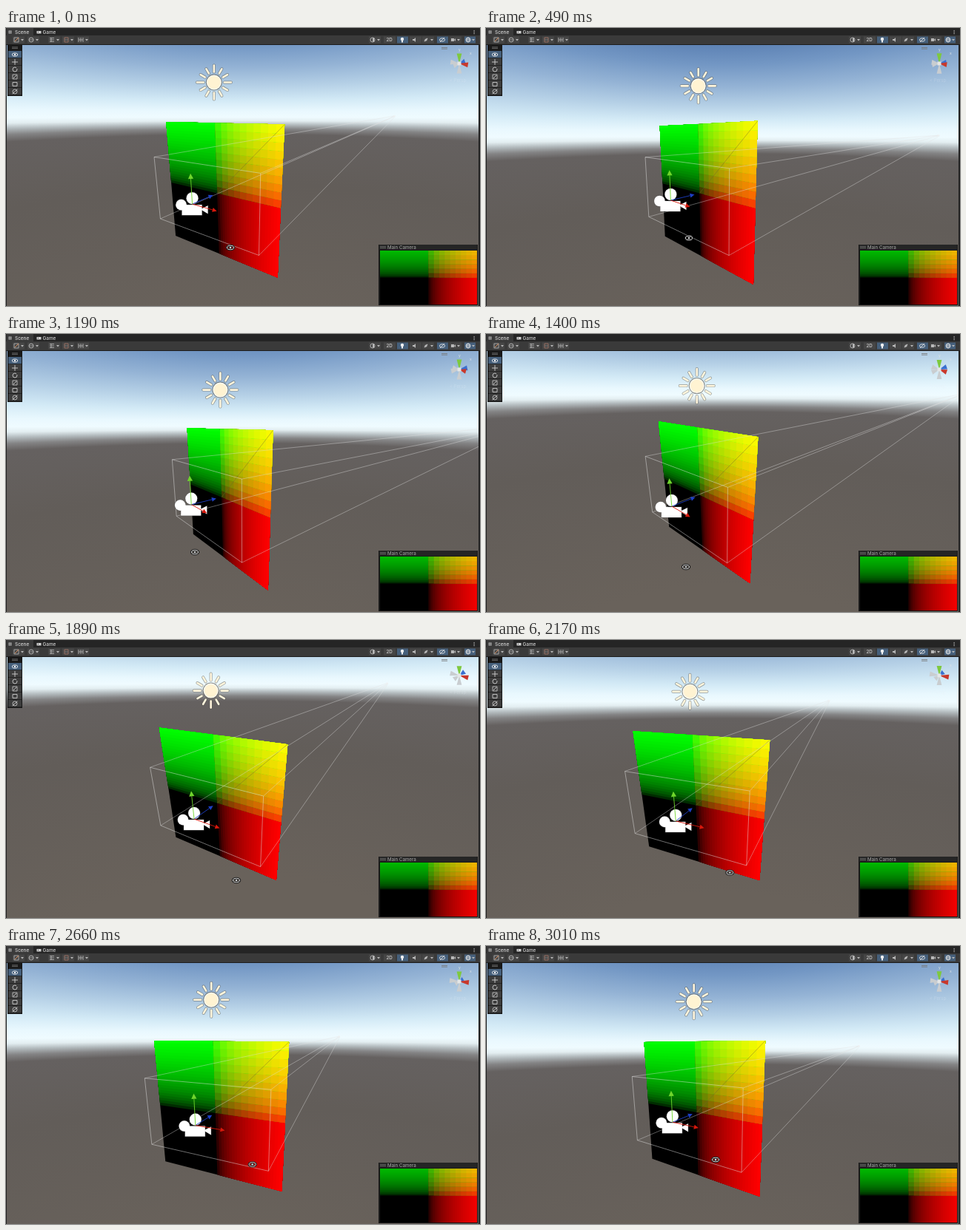
An HTML page with a canvas for the animation above (3080 ms loop, 640 px wide and 376 px high).

```html
<!DOCTYPE html>
<html lang="en">
<head>
<meta charset="utf-8">
<title>Scene view orbit</title>
<style>
  html, body { margin: 0; width: 100%; height: 100%; overflow: hidden; background: #645e5a; }
  canvas { display: block; width: 640px; height: 376px; }
</style>
</head>
<body>
<canvas id="stage" width="640" height="376"></canvas>
<script>
const ctx = document.getElementById('stage').getContext('2d');
const LOOP = 3080, STEP = 70, TAU = Math.PI * 2, DEG = Math.PI / 180;

// The drag that turns the view: time, pointer x, pointer y.
const drag = [
  [0, 303, 297], [490, 274, 284], [1190, 255, 295], [1400, 270, 315],
  [1890, 311, 325], [2450, 338, 301], [3010, 310, 289]
];

function slope(k, c) {
  const last = drag.length - 1;
  const secant = i => (drag[i + 1][c] - drag[i][c]) / (drag[i + 1][0] - drag[i][0]);
  if (k === 0) return 1.5 * secant(0) - 0.5 * slope(1, c);
  if (k === last) return 1.5 * secant(last - 1) - 0.5 * slope(last - 1, c);
  const a = drag[k][0] - drag[k - 1][0], b = drag[k + 1][0] - drag[k][0];
  return (secant(k - 1) * b + secant(k) * a) / (a + b);
}

// Smooth curve through the drag points.
function pointer(t) {
  let k = 0;
  while (k < drag.length - 2 && t >= drag[k + 1][0]) k++;
  const span = drag[k + 1][0] - drag[k][0], s = (t - drag[k][0]) / span;
  const s2 = s * s, s3 = s2 * s;
  return [1, 2].map(c =>
    (2 * s3 - 3 * s2 + 1) * drag[k][c] + (3 * s2 - 2 * s3) * drag[k + 1][c] +
    span * ((s3 - 2 * s2 + s) * slope(k, c) + (s3 - s2) * slope(k + 1, c)));
}

// World, in units of the orbit radius; the pivot is the origin.
const CX = 320, CY = 199, FOCAL = 306.6;
const UNIT = 0.161, ASPECT = 1.8, ARROW = 0.13;
const CAMERA = [-0.124, -0.099, -0.192], SUN = [-0.135, 0.39, -0.017];

const add = (p, x, y, z) => [p[0] + x, p[1] + y, p[2] + z];

function orbit(px, py) {
  const yaw = (33.1 + 0.355 * (303 - px)) * DEG, pitch = (14.7 + 0.36 * (py - 297)) * DEG;
  const sy = Math.sin(yaw), cy = Math.cos(yaw), sp = Math.sin(pitch), cp = Math.cos(pitch);
  const turn = ([x, y, z]) => {
    const ahead = z * cy - x * sy;
    return [x * cy + z * sy, y * cp + ahead * sp, ahead * cp - y * sp];
  };
  const project = p => {
    const [x, y, z] = turn(p), k = FOCAL / (1 + z);
    return [CX + x * k, CY - y * k];
  };
  return { turn, project, depth: FOCAL / cp, horizon: CY - FOCAL * sp / cp };
}

// Corners of an upright rectangle, clockwise from top left.
const frame = (c, w, h) => [[-w, h], [w, h], [w, -h], [-w, -h]].map(([x, y]) => add(c, x, y, 0));

function rect(x, y, w, h, color) {
  ctx.fillStyle = color;
  ctx.fillRect(x, y, w, h);
}

function path(points, close) {
  ctx.beginPath();
  points.forEach(([x, y]) => ctx.lineTo(x, y));
  if (close) ctx.closePath();
}

function poly(points, color) {
  path(points, true);
  ctx.fillStyle = color;
  ctx.fill();
}

function line(points, color, width = 1, close = false) {
  path(points, close);
  ctx.strokeStyle = color;
  ctx.lineWidth = width;
  ctx.stroke();
}

function disc(x, y, r, color) {
  ctx.beginPath();
  ctx.arc(x, y, r, 0, TAU);
  ctx.fillStyle = color;
  ctx.fill();
}

function ring(x, y, rx, ry, color, width = 1) {
  ctx.beginPath();
  ctx.ellipse(x, y, rx, ry, 0, 0, TAU);
  ctx.strokeStyle = color;
  ctx.lineWidth = width;
  ctx.stroke();
}

function text(str, x, y, size, color, weight = 400) {
  ctx.font = `${weight} ${size}px Inter, Roboto, sans-serif`;
  ctx.fillStyle = color;
  ctx.fillText(str, x, y);
}

const level = x => Math.round(255 * Math.pow(x, 1 / 2.2));

// Red grows right of the middle, green above it; later cells cover earlier ones.
function colorPlane(map, maxR, maxG, cols, rows) {
  const cell = (u0, v0, u1, v1, r, g) =>
    poly([map(u0, v0), map(u1, v0), map(u1, v1), map(u0, v1)], `rgb(${r},${g},0)`);
  const fine = 24;
  cell(0, 0, 1, 1, 0, 0);
  for (let i = 0; i < fine; i++) {
    const s = i / fine, mid = s + 0.5 / fine;
    cell(0.5 + s / 2, 0.5, 1, 1, level(mid * maxR), 0);
    cell(0, 0, 0.5, 0.5 - s / 2, 0, level(mid * maxG));
  }
  for (let j = 0; j < rows; j++)
    for (let i = 0; i < cols; i++)
      cell(0.5 + i / cols / 2, 0, 1, 0.5 - j / rows / 2,
        level((i + 0.5) / cols * maxR), level((j + 0.5) / rows * maxG));
}

// Colours by distance below the horizon at the middle of the view.
const skyStops = [
  [-125, '#5b80b3'], [-95, '#7397c4'], [-65, '#94b3d5'], [-40, '#b5d0e6'], [-20, '#d3eaf6'],
  [-6, '#e9f8fe'], [2, '#effbff'], [7, '#e3eef1'], [12, '#b4bcbf'], [18, '#848485'],
  [25, '#656160'], [90, '#625d59'], [260, '#69625b']
];

// Lines of equal elevation spread apart toward the sides.
function background({ horizon, depth }) {
  const top = skyStops[0][0], low = skyStops[skyStops.length - 1][0], strip = 4;
  for (let x = 0; x < 640; x += strip) {
    const k = Math.hypot(x + strip / 2 - CX, depth) / depth;
    const g = ctx.createLinearGradient(0, horizon + top * k, 0, horizon + low * k);
    for (const [d, color] of skyStops) g.addColorStop((d - top) / (low - top), color);
    rect(x, 22, strip, 354, g);
  }
}

function sun(x, y) {
  const rays = (color, width) => {
    for (let i = 0; i < 12; i++) {
      const c = Math.cos(i * TAU / 12), s = Math.sin(i * TAU / 12), far = i % 3 ? 21 : 23;
      line([[x + c * 14, y + s * 14], [x + c * far, y + s * far]], color, width);
    }
  };
  ctx.lineCap = 'round';
  rays('rgba(80,80,75,.55)', 4);
  rays('#fff5dc', 2.6);
  ctx.lineCap = 'butt';
  disc(x, y, 11, 'rgba(80,78,70,.6)');
  disc(x, y, 10, '#fffaf0');
  disc(x, y, 8.7, '#fff3d2');
}

function arrow(from, to, color, size) {
  const dx = to[0] - from[0], dy = to[1] - from[1], n = Math.hypot(dx, dy);
  const ux = dx / n, uy = dy / n, b = [to[0] - ux * size * 2, to[1] - uy * size * 2];
  line([from, b], color, 0.9);
  poly([to, [b[0] - uy * size, b[1] + ux * size], [b[0] + uy * size, b[1] - ux * size]], color);
}

function cameraIcon(x, y) {
  const shape = (grow, color) => {
    disc(x - 15, y + 1, 7.3 + grow, color);
    disc(x, y - 8, 8 + grow, color);
    rect(x - 14 - grow, y + 1 - grow, 27 + 2 * grow, 14 + 2 * grow, color);
    poly([[x + 11, y + 7], [x + 21 + grow, y + 2 - grow], [x + 21 + grow, y + 13 + grow]], color);
  };
  shape(0.6, 'rgba(90,90,90,.5)');
  shape(0, '#ffffff');
}

function eye(x, y) {
  ring(x, y, 5, 3, '#1c1c1c', 2.4);
  ring(x, y, 4.6, 2.7, '#e8e8e8', 0.9);
  disc(x, y, 2.2, '#222');
  disc(x, y, 1.2, '#ddd');
}

// Cones point inward; the far ones are drawn first.
function cornerGizmo(turn) {
  const x0 = 612, y0 = 48, size = 14;
  const cones = [];
  ['#c8382c', '#7ec93e', '#3a6fd0'].forEach((color, axis) => {
    for (const side of [-1, 1]) {
      const [x, y, z] = turn([0, 1, 2].map(i => (i === axis ? side : 0)));
      cones.push({ x, y: -y, z, color: side > 0 ? color : '#c9cdd0' });
    }
  });
  cones.sort((a, b) => b.z - a.z);
  for (const { x, y, color } of cones) {
    const n = Math.hypot(x, y), bx = x0 + x * size, by = y0 + y * size;
    const wx = -y / n * 3.4, wy = x / n * 3.4;
    poly([[x0, y0], [bx + wx, by + wy], [bx - wx, by - wy]], color);
  }
  rect(x0 - 2.5, y0 - 2.5, 5, 5, '#e4e6e6');
  text('y', 611, 31, 5, '#dfe8e0');
  text('x', 626, 36, 5, '#dfe4e8');
  text('< Persp', 599, 73, 6, 'rgba(240,245,250,.25)');
}

const ICON = '#b9b9b9', BUTTON = '#464646', ACTIVE = '#46607c';
const caret = x => poly([[x - 2, 15], [x + 2, 15], [x, 17.4]], ICON);
const button = (x, w, color = BUTTON) => rect(x, 11.5, w, 9, color);
const handle = (x, y) => { rect(x, y, 8, 0.8, '#777'); rect(x, y + 1.8, 8, 0.8, '#777'); };

function topBars() {
  rect(0, 0, 640, 11, '#252525');
  rect(1, 0, 36, 11, '#3a3a3a');
  rect(0, 10, 640, 12, '#3a3a3a');
  rect(0, 22, 640, 1, '#1d1d1d');
  for (const k of [0, 2]) {
    line([[4.5 + k, 3], [4.5 + k, 8]], ICON, 0.7);
    line([[3, 4.5 + k], [8, 4.5 + k]], ICON, 0.7);
  }
  text('Scene', 12, 8, 6.4, '#d6d6d6', 500);
  rect(41.5, 4, 6, 3.5, '#d0d0d0');
  rect(43, 5, 1, 1, '#333');
  text('Game', 49.5, 8, 6.4, '#d0d0d0', 500);
  for (const y of [3, 5, 7]) rect(631.5, y, 1.2, 1.2, ICON);

  for (const x of [9, 29, 57, 76, 96, 490, 510, 545, 562, 599]) button(x, 16);
  for (const x of [528, 582, 619]) button(x, 15, ACTIVE);
  for (const x of [22, 42, 70, 89, 109, 503, 575, 611, 631]) caret(x);

  line([[11, 13], [17, 13], [17, 19], [11, 19]], ICON, 0.8, true);
  line([[12, 18], [17, 13]], '#d79062');
  ring(34, 16, 3, 3, ICON, 0.9);
  line([[31, 16], [37, 16]], ICON, 0.7);
  for (const y of [13.5, 16, 18.5]) line([[59, y], [65, y]], ICON, 0.8);
  line([[61, 13], [61, 19]], ICON, 0.8);
  line([[79, 13], [84, 13], [84, 19], [79, 19]], '#a97867', 0.8, true);
  line([[79, 16], [84, 16]], '#8a8a8a', 0.7);
  for (const x of [98, 101, 104]) line([[x, 13], [x, 19]], ICON, 0.8);
  line([[98, 16], [104, 16]], ICON, 0.8);

  ring(495, 16, 3, 3, ICON, 0.9);
  rect(495, 13.5, 2, 5, ICON);
  text('2D', 513.5, 18.2, 6.2, '#d0d0d0', 500);
  disc(535, 15, 2.2, '#f0f0f0');
  rect(534, 16.5, 2, 3, '#f0f0f0');
  poly([[549, 15], [551, 15], [553, 13], [553, 19], [551, 17], [549, 17]], ICON);
  line([[565, 18], [569, 14]], ICON, 1.4);
  disc(567, 16, 1.6, ICON);
  ring(589, 16, 3.6, 2.2, '#e4e4e4', 0.9);
  line([[586, 19], [592, 13]], '#e4e4e4', 0.9);
  rect(601, 14, 4, 4, ICON);
  poly([[605, 16], [607, 14], [607, 18]], ICON);
  ring(624, 16, 3, 3, '#e4e4e4', 0.9);
  ring(624, 16, 1.3, 3, '#e4e4e4', 0.7);
  line([[621, 16], [627, 16]], '#e4e4e4', 0.7);
}

function toolPanel() {
  const x = 12, c = '#cfcfcf';
  rect(2, 23, 20, 69, '#191919');
  handle(8, 25.5);
  for (let i = 0; i < 6; i++) rect(3, 31 + i * 10, 18, 9.3, i ? '#3d3d3d' : ACTIVE);
  ring(x, 36, 3.8, 2.2, '#f0f0f0', 0.9);
  disc(x, 36, 1.2, '#f0f0f0');
  line([[8, 46], [16, 46]], c, 0.9);
  line([[x, 42], [x, 50]], c, 0.9);
  ring(x, 56, 3, 3, c, 0.9);
  rect(14, 53, 2, 2, '#3d3d3d');
  line([[9, 63], [15, 63], [15, 69], [9, 69]], c, 0.8, true);
  line([[10, 68], [14, 64]], c, 0.9);
  line([[9, 73.5], [15, 73.5], [15, 78.5], [9, 78.5]], c, 0.9, true);
  ring(x, 86, 3, 3, c, 0.8);
  line([[8.5, 89], [15.5, 83]], c, 0.9);
}

function preview() {
  rect(503, 293, 134, 82, '#191919');
  rect(504, 293, 132, 7, '#252525');
  handle(505, 295.3);
  text('Main Camera', 515, 299, 6.2, '#a8a8a8');
  colorPlane((u, v) => [505 + u * 131, 301 + v * 73], 0.9, 0.5, 9, 6);
}

function draw(t) {
  const [px, py] = pointer(t);
  const view = orbit(px, py), { project } = view;
  const center = add(CAMERA, 0, 0, UNIT), half = 2 * UNIT;
  const slice = z => frame(add(CAMERA, 0, 0, z * UNIT), ASPECT * UNIT, UNIT).map(project);
  const near = slice(0.3), far = slice(1000);

  background(view);
  colorPlane((u, v) => project(add(center, (2 * u - 1) * half, (1 - 2 * v) * half, 0)), 1, 1, 10, 10);
  line([project(center), project(add(center, half, half, 0))], 'rgba(110,100,50,.5)', 0.8);

  near.forEach((p, i) => line([p, far[i]], 'rgba(225,225,225,.5)', 0.8));
  line(near, 'rgba(230,230,230,.6)', 0.8, true);
  rect(far[0][0] - 1, far[0][1] - 1, 2.5, 2, 'rgba(240,240,240,.6)');

  sun(...project(SUN));
  const origin = project(CAMERA);
  cameraIcon(...origin);
  arrow(origin, project(add(CAMERA, 0, 0, ARROW)), '#1d3fc4', 3);
  arrow(origin, project(add(CAMERA, ARROW, 0, 0)), '#d8180c', 3);
  arrow(origin, project(add(CAMERA, 0, ARROW, 0)), '#6fd62c', 3.6);
  eye(px, py);

  handle(588, 26);
  cornerGizmo(view.turn);
  rect(0, 22, 1, 354, '#222');
  rect(638, 22, 2, 354, '#222');
  topBars();
  toolPanel();
  preview();
}

const start = performance.now();
let shown = -1;
function tick() {
  const t = Math.floor((performance.now() - start) % LOOP / STEP) * STEP;
  if (t !== shown) draw(shown = t);
  requestAnimationFrame(tick);
}
tick();
</script>
</body>
</html>
```
